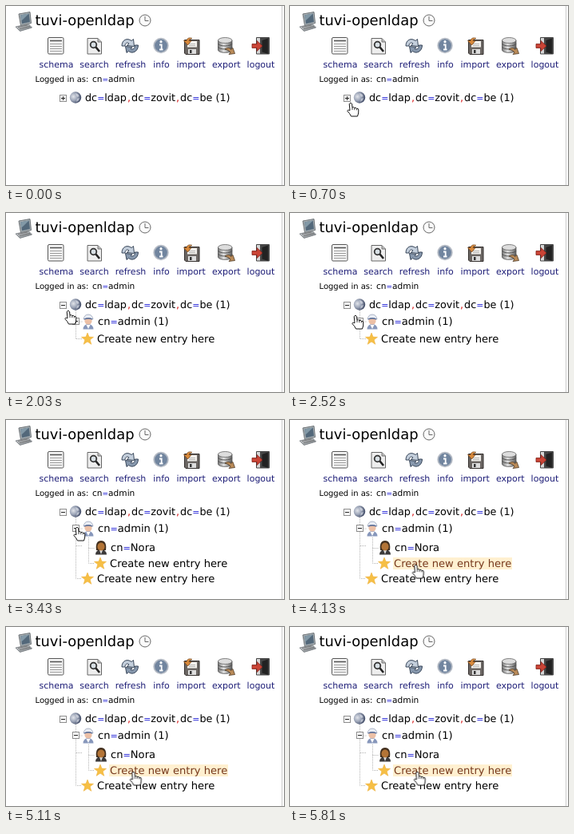
Animation, 348 px wide and 224 px high, one loop 6930 ms. Source, as an HTML page:

```html
<!DOCTYPE html>
<html lang="en">
<head>
<meta charset="utf-8">
<title>Directory tree</title>
<style>
html, body { margin: 0; width: 100%; height: 100%; overflow: hidden; background: #fff; }
svg { display: block; width: 100vw; height: 100vh; }
text { font-family: "DejaVu Sans", Verdana, sans-serif; font-size: 13.1px; text-rendering: geometricPrecision; }
.title { font-size: 17.9px; }
.menu text { font-size: 11px; fill: #1f1f78; text-anchor: middle; }
.small { font-size: 10px; }
.login { font-size: 10.6px; }
.root { font-size: 12.8px; }
.eq { fill: #2020d8; font-size: .85em; }
.comma { fill: #d81818; }
.branch { fill: none; stroke: #b4b4b4; stroke-dasharray: 1 1; }
.box { fill: #fff; stroke: #8c8c8c; }
.sign { fill: none; stroke: #222; }

/* One loop is 99 ticks of 70 ms; tick n sits at n/99. */
.anim { animation: 6.93s step-end infinite; }
.level1 { animation-name: level1; }
.level2 { animation-name: level2; }
.plus1 { animation-name: plus1; }
.plus2 { animation-name: plus2; }
.drop { animation-name: drop; }
.inner { animation-name: inner; }
.outer { animation-name: outer; }
.cursor { animation-name: move; }
.hand { animation-name: hand; }
.arrow { animation-name: arrow; }
.link { color: #fff; fill: #000; }
.link rect { fill: currentColor; }

@keyframes level1 { 0% { opacity: 0 } 25.2525%, 100% { opacity: 1 } }
@keyframes level2 { 0% { opacity: 0 } 45.4545%, 100% { opacity: 1 } }
@keyframes plus1 { 0% { opacity: 1 } 25.2525%, 100% { opacity: 0 } }
@keyframes plus2 { 0% { opacity: 1 } 45.4545%, 100% { opacity: 0 } }
@keyframes drop { 0% { transform: translateY(-41px) } 45.4545%, 100% { transform: none } }
@keyframes inner {
  0%, 62.6262%, 79.7979% { color: #fff; fill: #000 }
  57.5757%, 71.7171%, 83.8383%, 100% { color: #fff0d0; fill: #773a1e }
}
@keyframes outer {
  0%, 71.7171%, 83.8383%, 100% { color: #fff; fill: #000 }
  62.6262%, 79.7979% { color: #fff0d0; fill: #773a1e }
}
@keyframes hand {
  0%, 53.5353%, 62.6262%, 79.7979% { opacity: 0 }
  9.0909%, 57.5757%, 71.7171%, 83.8383%, 100% { opacity: 1 }
}
@keyframes arrow {
  0%, 53.5353%, 62.6262%, 79.7979% { opacity: 1 }
  9.0909%, 57.5757%, 71.7171%, 83.8383%, 100% { opacity: 0 }
}
@keyframes move {
  0% { transform: translate(100px, 228px) }
  1.0101% { transform: translate(98px, 216px); animation-timing-function: steps(9) }
  10.101% { transform: translate(76px, 121px); animation-timing-function: steps(3) }
  13.1313% { transform: translate(73px, 118px); animation-timing-function: steps(8) }
  21.2121%, 26.2626% { transform: translate(72px, 113px); animation-timing-function: steps(5) }
  31.3131%, 37.3737% { transform: translate(82px, 128px); animation-timing-function: steps(5) }
  42.4242%, 53.5353% { transform: translate(89px, 134px); animation-timing-function: steps(6) }
  59.5959% { transform: translate(157.5px, 181px); animation-timing-function: steps(4) }
  63.6363% { transform: translate(159px, 193px); animation-timing-function: steps(4) }
  67.6767%, 69.6969% { transform: translate(160px, 189px); animation-timing-function: steps(2) }
  71.7171%, 78.7878% { transform: translate(159.5px, 181px) }
  79.7979%, 81.8181% { transform: translate(160px, 194px) }
  83.8383%, 100% { transform: translate(159.5px, 181px) }
}
</style>
</head>
<body>
<svg viewBox="0 0 348 224" preserveAspectRatio="none">
  <defs>
    <linearGradient id="steel" x2="1" y2="1">
      <stop stop-color="#dfe2e4"/><stop offset="1" stop-color="#686e73"/>
    </linearGradient>
    <linearGradient id="metal">
      <stop stop-color="#777"/><stop offset=".4" stop-color="#e4e4e4"/><stop offset="1" stop-color="#5c5c5c"/>
    </linearGradient>
    <radialGradient id="ball" cx=".32" cy=".42" r=".7">
      <stop stop-color="#e2e4ea"/><stop offset=".5" stop-color="#9aa3b6"/><stop offset="1" stop-color="#3a4460"/>
    </radialGradient>
    <path id="star" d="M0-7.5L2-2.4L7.5-2.2L3.2 1.3L4.8 6.8L0 3.6L-4.8 6.8L-3.2 1.3L-7.5-2.2L-2-2.4Z" fill="#f6bf45" stroke="#eeb13c" stroke-width=".6" stroke-linejoin="round"/>
  </defs>
  <rect width="348" height="224" fill="#fff"/>
  <path d="M345.500 0V224" stroke="#ccc"/>

  <!-- header -->
  <g stroke-linejoin="round">
    <path d="M16 10L30 7.500L31.500 21.500L18.500 24.500Z" fill="#a9b0b4" stroke="#6c7276"/>
    <path d="M18 11.500L28.700 9.500L30 20L20 22.300Z" fill="#53687a"/>
    <path d="M18 11.500L28.700 9.500L19.500 18.500Z" fill="#8298a6"/>
    <path d="M12 26L28 22.500L32.500 27L17.500 31.500Z" fill="url(#steel)" stroke="#70757a" stroke-width=".8"/>
    <path d="M15 26.500L27 24M17 28.500L30 25.500" stroke="#666" stroke-width=".8"/>
  </g>
  <text class="title" x="36.500" y="24">tuvi-openldap</text>
  <g fill="none" stroke="#666">
    <circle cx="174" cy="18" r="7" fill="#fbfbfb"/>
    <path d="M174 13V18.500H178.500" stroke="#666"/>
  </g>

  <!-- toolbar -->
  <g class="menu">
    <g>
      <rect x="52.500" y="39.500" width="19.500" height="20.500" rx="1.500" fill="#f7f7f7" stroke="#555"/>
      <path d="M55 43.500H70" stroke="#555" stroke-width="1.600"/>
      <path d="M55 47.500H70M55 50.500H70M55 53.500H70M55 56.500H70" stroke="#999"/>
    </g>
    <g>
      <path d="M102 40.500H115L119.500 45V60H102Z" fill="#eee" stroke="#666"/>
      <path d="M115 40.500V45H119.500" fill="#bbb" stroke="#777"/>
      <circle cx="109.500" cy="48.500" r="3.800" fill="#d8e0e5" stroke="#333" stroke-width="1.800"/>
      <path d="M112.500 51.500L117 57" stroke="#222" stroke-width="2.600"/>
    </g>
    <g fill="#c3cedb" stroke="#39475a" stroke-linejoin="round">
      <path d="M145 50C145 42 152 39.500 157 43.500L159.500 41.500L160.500 50.500L151.500 49.500L154 47C151.500 45 149 46.500 149 50Z"/>
      <path d="M165.500 49C165.500 57 158 60.500 153.500 56.500L151 58.500L149.500 50.500L158 51.500L156 53.500C159 55 161.500 53 161.500 49Z" fill="#8798ad"/>
    </g>
    <g>
      <circle cx="194" cy="49.500" r="8.800" fill="#71859f" stroke="#b4bac4" stroke-width="1.800"/>
      <circle cx="194" cy="44.700" r="1.600" fill="#fff"/>
      <path d="M192 48.500H194.700V54.500M192 54.500H196.500" fill="none" stroke="#fff" stroke-width="1.800"/>
    </g>
    <g stroke-linejoin="round">
      <path d="M223.500 42.500H242V60.500H225L223.500 59Z" fill="#6b6663" stroke="#35302e"/>
      <rect x="227" y="44" width="12" height="7.500" fill="#f4f2ee"/>
      <path d="M229 47.500H237M229 49.500H237" stroke="#aaa" stroke-width=".8"/>
      <rect x="228" y="54" width="10" height="6" fill="#ddd"/>
      <rect x="230" y="55" width="2.500" height="4" fill="#333"/>
      <path d="M233 40.500C229 39 226.500 40.500 226 43.500H222.500L227.500 49L232 43.500H229C229.500 42 231 41 233 40.500Z" fill="#d98a3c" stroke="#7a4a1e" stroke-width=".8"/>
    </g>
    <g>
      <path d="M265.500 43V55C265.500 59.500 283 59.500 283 55V43Z" fill="url(#metal)" stroke="#555" stroke-width=".8"/>
      <ellipse cx="274.250" cy="43" rx="8.750" ry="3.500" fill="#ddd" stroke="#666" stroke-width=".8"/>
      <path d="M265.500 47C266 51 282.500 51 283 47M265.500 51C266 55 282.500 55 283 51" fill="none" stroke="#555"/>
      <path d="M274 54C278 51.500 280.500 52.500 281.500 54.500L284 52.500L286.500 59.500L279 60.500L281 58C279 55.500 277 55 274 54Z" fill="#b98a58" stroke="#4d3a28" stroke-width=".8"/>
    </g>
    <g>
      <path d="M313.500 39.500H329.500V60H313.500Z" fill="#d6d6d6" stroke="#444"/>
      <path d="M318 40H329V60H318Z" fill="#474747"/>
      <path d="M320.500 43L328 40.500V60L320.500 57.500Z" fill="#222"/>
      <path d="M308 47.500H314V43.500L321 50L314 56.500V52.500H308Z" fill="#c94436" stroke="#7e2018" stroke-width=".8"/>
    </g>
    <text x="63" y="77">schema</text>
    <text x="110.500" y="77">search</text>
    <text x="156" y="77">refresh</text>
    <text x="194.500" y="77">info</text>
    <text x="231.700" y="77">import</text>
    <text x="275.700" y="77">export</text>
    <text x="319" y="77">logout</text>
  </g>
  <text class="small" x="36.500" y="95">Logged in as:</text>
  <text class="login" x="108" y="95">cn<tspan class="eq">=</tspan>admin</text>

  <!-- root entry -->
  <path class="branch anim level1" d="M87.500 122V157.500H95M87.500 136H96"/>
  <rect class="box" x="67.500" y="111.500" width="8" height="8"/>
  <path class="sign" d="M69 115.500H74"/>
  <path class="sign anim plus1" d="M71.500 113V118"/>
  <circle cx="87" cy="114.500" r="7.200" fill="url(#ball)"/>
  <path d="M87 109Q91 110 91.500 113Q89 115 88 112ZM89 116L92 115L91 118L88 120Z" fill="#e4e7ee" opacity=".6"/>
  <text class="root" x="99" y="119">dc<tspan class="eq">=</tspan>ldap<tspan class="comma" dx="1">,</tspan><tspan dx="1">dc</tspan><tspan class="eq">=</tspan>zovit<tspan class="comma" dx="1">,</tspan><tspan dx="1">dc</tspan><tspan class="eq">=</tspan>be (1)</text>

  <!-- first level -->
  <g class="anim level1">
    <rect class="box" x="83.500" y="131.500" width="8" height="8"/>
    <path class="sign" d="M85 135.500H90"/>
    <path class="sign anim plus2" d="M87.500 133V138"/>
    <path d="M96.500 145.500Q97 139 103 139Q109 139 109.500 145.500Z" fill="#8797bb"/>
    <path d="M100.500 140L103 145L105.500 140Z" fill="#fff"/>
    <circle cx="103" cy="135" r="4.600" fill="#ecc0a6"/>
    <path d="M97 133Q98 127 103 127Q108 127 109 133Q103 131 97 133Z" fill="#e9edf4" stroke="#8e9ab2" stroke-width=".7"/>
    <path d="M98 133Q103 130.500 108 133" fill="none" stroke="#566a94" stroke-width="1.300"/>
    <text x="115" y="140">cn<tspan class="eq">=</tspan>admin (1)</text>
  </g>

  <!-- second level -->
  <g class="anim level2">
    <path class="branch" d="M87.500 146V198.500H95M103.500 147V179.500H111M103.500 160.500H111"/>
    <path d="M112 168.500Q112.500 162 119 162Q125.500 162 126 168.500Z" fill="#3c3a3a"/>
    <path d="M117 163L119 168L121 163Z" fill="#ddd"/>
    <path d="M113 163Q111.500 151 119 151Q126.500 151 125 163Z" fill="#43301f"/>
    <ellipse cx="119" cy="158.500" rx="4.600" ry="5" fill="#b37436"/>
    <text x="131" y="164">cn<tspan class="eq">=</tspan>Nora</text>
    <use href="#star" x="118" y="179.500"/>
    <g class="link anim inner">
      <rect x="129" y="172" width="149" height="15"/>
      <text x="130" y="184">Create new entry here</text>
    </g>
  </g>
  <g class="anim level1">
    <g class="anim drop">
      <use href="#star" x="102" y="198.500"/>
      <g class="link anim outer">
        <rect x="113" y="191" width="149" height="15"/>
        <text x="114" y="203">Create new entry here</text>
      </g>
    </g>
  </g>

  <!-- pointer -->
  <g class="anim cursor" stroke-linejoin="round">
    <path class="anim arrow" d="M0 0V14L3.200 11L5.600 16.400L8 15.400L5.800 10.200H10Z" stroke="#fff" stroke-width=".9"/>
    <g class="anim hand" stroke="#111">
      <path d="M-1.800 1.500Q0-1.200 1.600 1.500L2 6Q4 4.800 4.800 6.600Q6.800 5.600 7.400 7.400Q9.600 6.600 9.800 9Q10.200 13 8.500 17H.5Q-1 13.500-4 10.600Q-4.600 8.600-1 9.600Z" fill="#fff"/>
      <path d="M2 6V9M4.800 6.600V9.200M7.400 7.400V9.400" fill="none" stroke-width=".8"/>
    </g>
  </g>
</svg>
</body>
</html>
```
